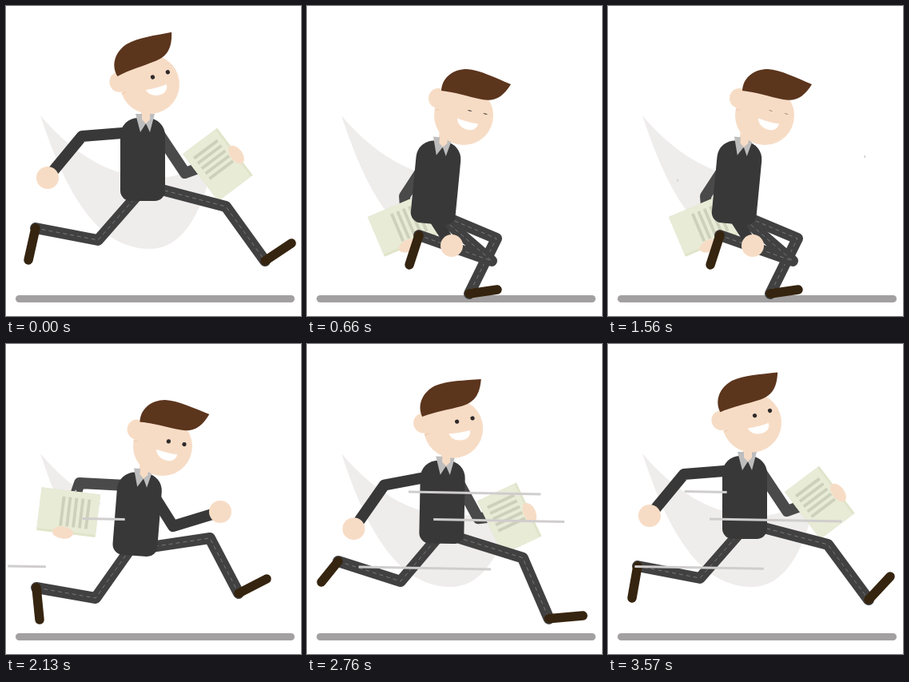
Write an HTML page with a canvas that moves like this. It is 369x388 px and loops after 3.6 s.

```html
<!DOCTYPE html>
<html>
<head>
<meta charset="utf-8">
<title>Running man</title>
<style>
html, body { margin: 0; width: 100%; height: 100%; overflow: hidden; background: #fff; }
canvas { display: block; width: 369px; height: 388px; }
</style>
</head>
<body>
<canvas id="stage" width="369" height="388"></canvas>
<script>
const ctx = document.getElementById('stage').getContext('2d');
const LOOP = 3600, FRAME = 30, STRIDE = 900, STEP = 450;
const SKIN = '#f7dcc5', CLOTH = '#383838', TROUSERS = '#414141', SLEEVE = '#4a4a4a';
const clamp = (v, lo = 0, hi = 1) => Math.min(hi, Math.max(lo, v));
const smooth = u => u * u * (3 - 2 * u);
const rad = deg => deg * Math.PI / 180;

// Periodic monotone cubic through rows of [time, ...values].
function track(rows, period) {
  const n = rows.length;
  const at = i => {
    const k = ((i % n) + n) % n;
    return { t: rows[k][0] + period * Math.floor(i / n), v: rows[k].slice(1) };
  };
  const rate = (i, c) => (at(i + 1).v[c] - at(i).v[c]) / (at(i + 1).t - at(i).t);
  const slope = (i, c) => {
    const a = rate(i - 1, c), b = rate(i, c);
    return a * b > 0 ? 2 * a * b / (a + b) : 0;
  };
  return time => {
    const t = time % period;
    let i = n - 1;
    while (i > 0 && rows[i][0] > t) i--;
    const p = at(i), q = at(i + 1), span = q.t - p.t, u = (t - p.t) / span, w = 1 - u;
    return p.v.map((v, c) =>
      v * w * w * (1 + 2 * u) + q.v[c] * u * u * (3 - 2 * u) +
      span * u * w * (slope(i, c) * w - slope(i + 1, c) * u));
  };
}

// Limb poses are joint positions; bones are interpolated as angle and length.
function limb(poses) {
  let last = null;
  const rows = poses.map(([t, ...p]) => {
    const row = [t, p[0], p[1]];
    for (let i = 2; i < p.length; i += 2) {
      const dx = p[i] - p[i - 2], dy = p[i + 1] - p[i - 1];
      let a = Math.atan2(dy, dx);
      if (last) a += Math.round((last[row.length] - a) / (2 * Math.PI)) * 2 * Math.PI;
      row.push(a, Math.hypot(dx, dy));
    }
    return last = row;
  });
  const value = track(rows, STRIDE);
  return t => {
    const v = value(t), joints = [[v[0], v[1]]];
    for (let i = 2; i < v.length; i += 2) {
      const [x, y] = joints[joints.length - 1];
      joints.push([x + Math.cos(v[i]) * v[i + 1], y + Math.sin(v[i]) * v[i + 1]]);
    }
    return joints;
  };
}

// hip, knee, ankle, toe
const leg = limb([
  [0, 172, 228, 115, 293, 37, 278, 28, 318],
  [60, 172, 232, 117, 297, 39, 272, 18, 298],
  [210, 165, 262, 231, 319, 140, 287, 128, 324],
  [330, 168, 256, 255, 243, 291, 312, 326, 294],
  [420, 172, 224, 275, 251, 326, 320, 353, 291],
  [450, 172, 224, 275, 251, 324, 319, 357, 297],
  [525, 170, 240, 268, 272, 295, 350, 338, 348],
  [660, 168, 262, 237, 291, 203, 360, 238, 355],
  [780, 160, 250, 112, 318, 38, 305, 42, 345],
  [870, 172, 228, 115, 293, 37, 278, 30, 318]
]);

// shoulder, elbow, hand
const freeArm = limb([
  [0, 158, 158, 95, 163, 52, 215],
  [210, 150, 195, 122, 238, 127, 300],
  [330, 182, 185, 209, 228, 268, 210],
  [450, 190, 158, 224, 209, 286, 186],
  [660, 160, 195, 154, 258, 181, 300],
  [780, 150, 176, 92, 173, 71, 236],
  [870, 158, 158, 95, 163, 52, 215]
]);
const paperArm = limb([
  [0, 190, 158, 224, 209, 288, 186],
  [210, 160, 195, 148, 250, 165, 298],
  [330, 150, 177, 92, 174, 71, 236],
  [450, 157, 158, 94, 163, 52, 213],
  [660, 150, 195, 122, 238, 127, 300],
  [780, 182, 185, 209, 228, 268, 210],
  [870, 190, 158, 224, 209, 288, 186]
]);
const paperTurn = track([[0, -37], [210, 48], [330, 97], [450, 118], [660, 67], [780, -12], [870, -37]], STRIDE);

// torso x, y, tilt; head x, y, tilt; extra hair tilt
const body = track([
  [0, 171, 192, 0, 180, 98, -30, -4],
  [210, 161.5, 221, 5.5, 196, 137, 0, 0],
  [330, 164.5, 213, 4.5, 196, 128, -1, 0],
  [420, 171, 192, 0, 180, 98.5, -29.5, 0]
], STEP);

function placed(x, y, deg, draw) {
  ctx.save();
  ctx.translate(x, y);
  ctx.rotate(rad(deg));
  draw();
  ctx.restore();
}

function fillPath(d, color) {
  ctx.fillStyle = color;
  ctx.fill(new Path2D(d));
}

function oval(x, y, rx, ry, color) {
  ctx.fillStyle = color;
  ctx.beginPath();
  ctx.ellipse(x, y, rx, ry, 0, 0, 2 * Math.PI);
  ctx.fill();
}

function box(x, y, w, h, r, color) {
  ctx.fillStyle = color;
  ctx.beginPath();
  ctx.roundRect(x, y, w, h, r);
  ctx.fill();
}

function stroke(points, width, color, cap = 'round', dash = []) {
  ctx.lineWidth = width;
  ctx.strokeStyle = color;
  ctx.lineCap = cap;
  ctx.lineJoin = 'round';
  ctx.setLineDash(dash);
  ctx.beginPath();
  points.forEach(p => ctx.lineTo(...p));
  ctx.stroke();
  ctx.setLineDash([]);
}

function drawSwish([x, y]) {
  const px = 165, py = 165;
  let a = Math.atan2(y - py, x - px);
  if (x > 230) a = rad(-20);
  ctx.save();
  ctx.beginPath();
  ctx.moveTo(px, py);
  ctx.arc(px, py, 400, a, rad(210));
  ctx.clip();
  fillPath('M43 137C75 235 115 304 180 304C225 304 250 250 262 180C235 222 135 246 43 137Z', '#efecec');
  ctx.restore();
}

function drawLeg(t) {
  const [hip, knee, ankle, toe] = leg(t);
  stroke([hip, knee, ankle], 14, TROUSERS);
  stroke([hip, knee, ankle], 1, '#777', 'butt', [5, 4]);
  stroke([ankle, toe], 11.5, '#35240f');
}

function drawPaper([x, y], turn) {
  placed(x, y, turn, () => {
    ctx.translate(-26, -4);
    box(-27, -37, 54, 74, 0, '#e0e4c9');
    box(-27, -37, 51, 74, 0, '#e8ebd6');
    for (let i = -2; i <= 2; i++) box(-19, i * 8 - 10, 37, 3.8, 0, '#cdd0bb');
    oval(26, 4, 7.5, 13, SKIN);
  });
}

function drawTorso() {
  box(-28, -52, 56, 104, [22, 22, 13, 13], CLOTH);
  fillPath('M-2 -66H10V-50L4 -44L-2 -50Z', SKIN);
  fillPath('M-9 -57H-1L-1 -50L4 -45L-3 -34Z', '#bdbdbd');
  fillPath('M15 -57H9L9 -50L4 -45L9 -34Z', '#bdbdbd');
}

function drawHead(open, hairTilt) {
  oval(-32, -21.5, 12, 12.5, SKIN);
  oval(0, 0, 37, 37, SKIN);
  stroke([[-36, -7], [-31, -7]], 1, '#ecc8ad');
  placed(7.5, -6, 10, () => oval(0, 0, 2.6, Math.max(0.3, 2.6 * open), '#2e2a2a'));
  placed(27, -2, 10, () => oval(0, 0, 2.6, Math.max(0.3, 2.6 * open), '#2e2a2a'));
  fillPath('M-8 3.5Q6 9 18 10.5C16 18 9 20 2 17C-5 14 -8 9 -8 3.5Z', '#fff');
  placed(0, 0, hairTilt, () =>
    fillPath('M-28 -31C-27 -48 -13 -58 4 -58C20 -57 40 -47 59 -39C49 -23 39 -17 23 -20C4 -24 -10 -29 -28 -31Z', '#5c351d'));
}

function drawSpeedLine(t, right, y, delay) {
  const since = t - 795 - delay, length = 234;
  if (since < 0) return;
  const p = since % 750;
  if (p > 720) return;
  const front = clamp((p - 90) / 450), tail = smooth(clamp((p - 435) / 135));
  const point = u => [right - length * u, y - 4.2 * u];
  const a = point(tail), b = point(front);
  if (a[0] - b[0] < 1.5) b[0] = a[0] - 1.5;
  stroke([a, b], 3, '#d0cdcd', 'butt');
}

function render(t) {
  const phase = t % STRIDE;
  const [tx, ty, tilt, hx, hy, headTilt, hairTilt] = body(t);
  const open = Math.min(...[640, 1560].map(c => clamp(Math.abs(t - c) / 90)));
  const carrying = paperArm(phase), free = freeArm(phase);
  ctx.fillStyle = '#fff';
  ctx.fillRect(0, 0, 369, 388);
  box(12, 362, 349, 9, 4.5, '#a2a0a1');
  drawSwish(carrying[2]);
  stroke(carrying, 14, SLEEVE);
  drawPaper(carrying[2], paperTurn(phase)[0]);
  drawLeg(phase);
  drawLeg(phase + STEP);
  placed(tx, ty, tilt, drawTorso);
  placed(hx, hy, headTilt, () => drawHead(open, hairTilt));
  stroke(free, 14, CLOTH);
  oval(...free[2], 14, 14, SKIN);
  drawSpeedLine(t, 322, 188.5, 0);
  drawSpeedLine(t, 322, 222.5, 60);
  drawSpeedLine(t, 230, 282, 57);
}

function tick() {
  const t = performance.now() % LOOP;
  render(Math.floor(t / FRAME) * FRAME);
  requestAnimationFrame(tick);
}
tick();
</script>
</body>
</html>
```
